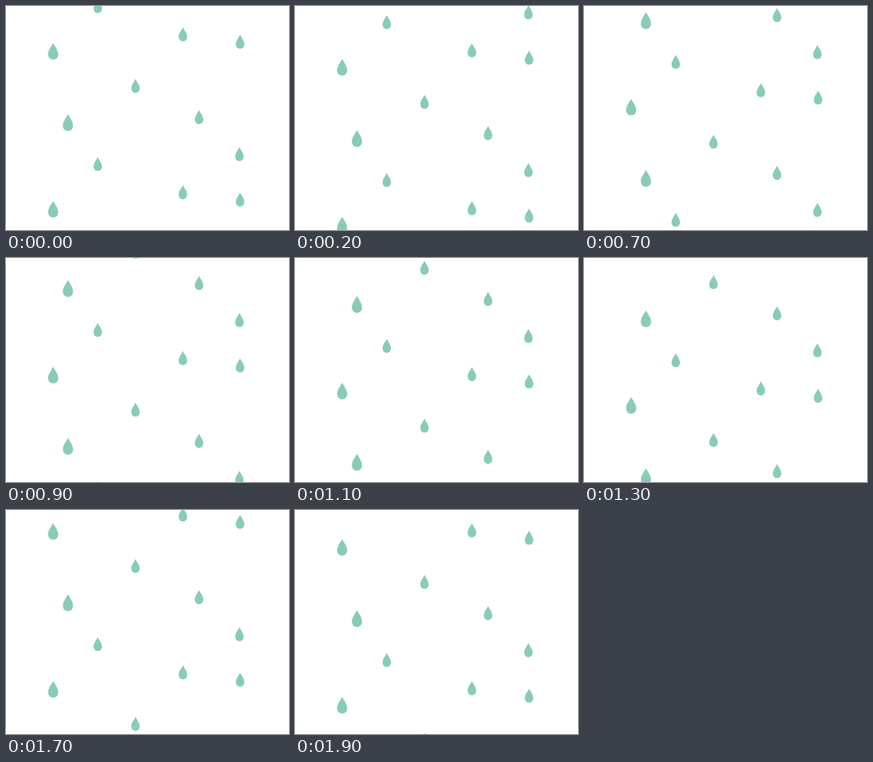
Write an HTML page that moves like this. It is 354 px wide and 281 px high and loops after 2 s.

```html
<!DOCTYPE html>
<html lang="en">
<head>
<meta charset="utf-8">
<title>Falling drops</title>
<style>
  html, body { margin: 0; width: 100%; height: 100%; overflow: hidden; background: #fff; }
  svg { display: block; width: 354px; height: 281px; }
  /* The pattern falls one tile (198px) per loop, in 100ms steps. */
  #rain { fill: #89ccb5; animation: fall 2s infinite; }
  @keyframes fall {
    0%   { transform: translateY(0); animation-timing-function: steps(12, end); }
    60%  { transform: translateY(120px); animation-timing-function: steps(1, end); }
    65%  { transform: translateY(128px); animation-timing-function: steps(7, end); }
    100% { transform: translateY(198px); }
  }
</style>
</head>
<body>
<svg viewBox="0 0 354 281">
  <defs>
    <path id="drop" d="M0 0C1.6 3.6 5.3 7.4 5.3 11.9C5.3 15.3 3 17.6 0 17.6S-5.3 15.3-5.3 11.9C-5.3 7.4-1.6 3.6 0 0Z"/>
  </defs>
  <g id="rain"></g>
</svg>
<script>
  const TILE = 198;
  const BIG = 1.2;
  // x of the tip, y of the tip, scale
  const drops = [
    [59, 46.2, BIG], [77.5, 135.6, BIG],
    [114.8, 189.4, 1], [162, 91.4, 1],
    [221.3, 26.8, 1], [241.5, 130.6, 1],
    [292, 177, 1], [292.8, 36, 1]
  ];
  const rain = document.getElementById('rain');

  for (const [x, y, scale] of drops) {
    for (let row = -2; row <= 1; row++) {
      const use = document.createElementNS('http://www.w3.org/2000/svg', 'use');
      use.setAttribute('href', '#drop');
      use.setAttribute('transform', `translate(${x} ${y + row * TILE}) scale(${scale})`);
      rain.append(use);
    }
  }
</script>
</body>
</html>
```
